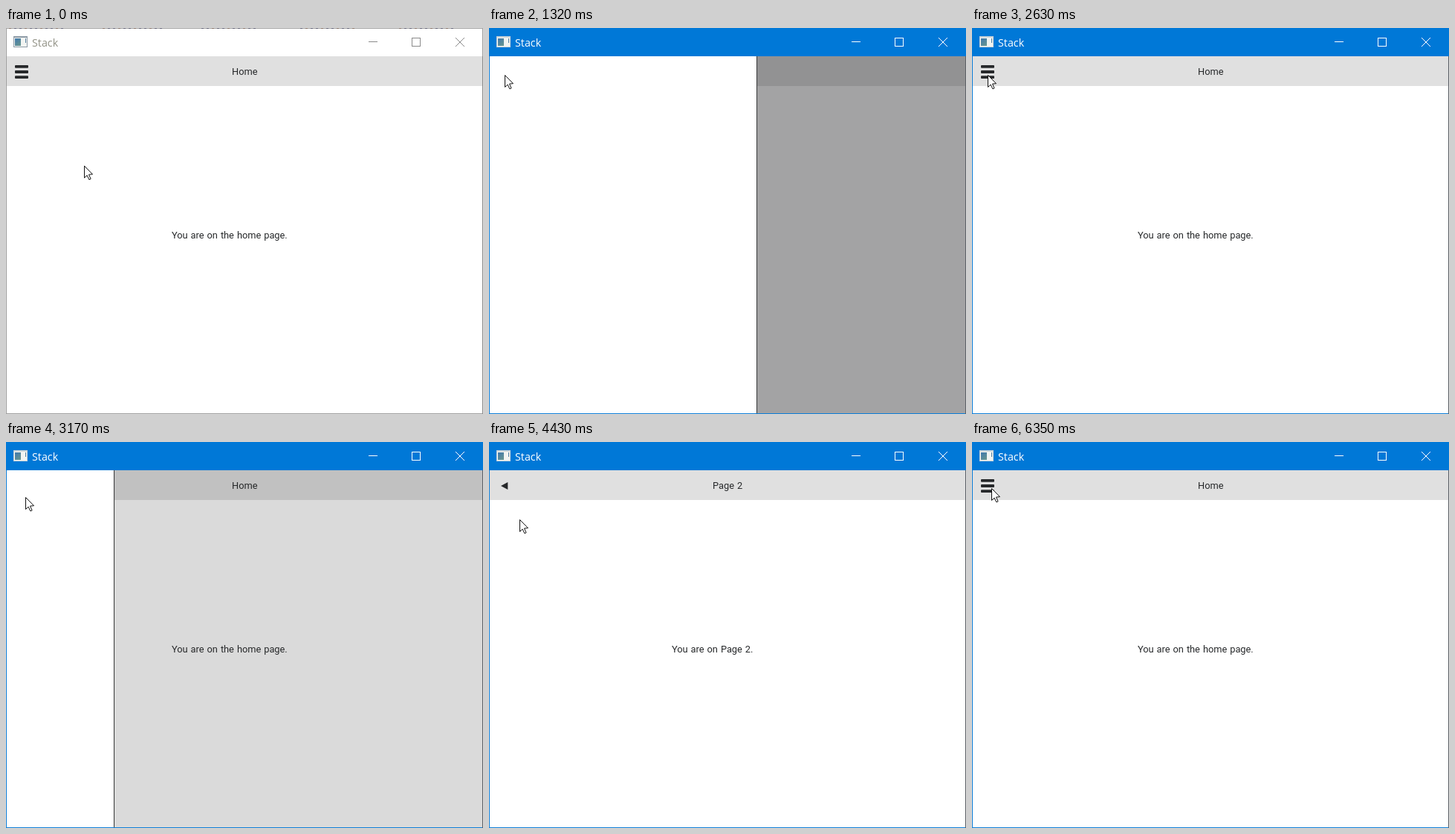
Animation, 642 px wide and 519 px high, one loop 6430 ms. Source, as an HTML page with a canvas:

```html
<!DOCTYPE html>
<html lang="en">
<head>
<meta charset="utf-8">
<title>Stack</title>
<style>
html, body { margin: 0; width: 100%; height: 100%; overflow: hidden; background: #fff; }
canvas { display: block; width: 642px; height: 519px; }
</style>
</head>
<body>
<canvas id="stage" width="642" height="519"></canvas>
<script>
const ctx = document.getElementById('stage').getContext('2d');
const W = 642, H = 519, LOOP = 6430;
const BAR = 38, TOOL = 40, VIEW = 640, DRAWER = 422.4;
const INK = '#26282a';
const UI_FONT = '12.8px Roboto, "Noto Sans", sans-serif';
const TITLE_FONT = '14.3px "Open Sans", "Noto Sans", sans-serif';

const PAGES = {
  home: { title: 'Home', titleX: 304, text: 'You are on the home page.', x: 223 },
  one: { title: 'Page 1', titleX: 301, text: 'You are on Page 1.', x: 246 },
  two: { title: 'Page 2', titleX: 301, text: 'You are on Page 2.', x: 246 }
};

// Screen refreshes: start, end, number of steps
const BURSTS = [
  [0, 540, 8], [690, 920, 4], [1170, 1710, 8], [2090, 2700, 9], [2780, 3170, 6],
  [3240, 3420, 3], [3480, 3650, 2], [3726, 4260, 8], [4430, 4500, 2],
  [5430, 6050, 9], [6120, 6350, 4]
];

const ACTIVE_AT = 530;
const NAV = [
  { at: 1270, from: 'home', to: 'one', dir: 1 },
  { at: 2190, from: 'one', to: 'home', dir: -1 },
  { at: 3796, from: 'home', to: 'two', dir: 1 },
  { at: 5883, from: 'two', to: 'home', dir: -1 }
];
const SLIDE_MS = 400, SLIDE_LAG = 17, DRAWER_MS = 200;
const DRAWER_OPEN = [[660, 1270], [3087, 3796]];
const TOOL_PRESS = [[530, 660], [2085, 2190], [2960, 3087], [5775, 5883]];
const ITEM_PRESS = [[1165, 1270, 0], [3700, 3796, 1]];

// Pointer keys: time, x, y
const POINTER = [
  [0, 105, 185], [470, 21, 63], [2600, 21, 63], [2960, 26, 74], [3170, 26, 74],
  [3420, 38, 100], [3480, 39, 101], [3650, 39, 102], [4260, 39, 102], [4500, 41, 104],
  [5400, 41, 104], [5430, 40, 103], [5740, 22, 66], [6050, 22, 66], [6350, 26, 62]
];

const clamp = v => Math.max(0, Math.min(1, v));
const inOutQuad = u => u < 0.5 ? 2 * u * u : 1 - 2 * (1 - u) * (1 - u);
const outCubic = u => 1 - Math.pow(1 - u, 3);
const within = (t, [a, b]) => t >= a && t < b;

function lastTick(t) {
  const [start, end, n] = BURSTS.filter(b => b[0] <= t).pop();
  const step = (end - start) / (n - 1);
  return start + step * Math.min(n - 1, Math.floor((t - start) / step + 0.1));
}

function pointerAt(t) {
  const i = POINTER.findIndex(k => k[0] > t);
  if (i < 0) return POINTER[POINTER.length - 1].slice(1);
  const a = POINTER[i - 1], b = POINTER[i];
  const u = inOutQuad((t - a[0]) / (b[0] - a[0]));
  return [1, 2].map(k => Math.round(a[k] + (b[k] - a[k]) * u));
}

function drawerAt(t) {
  const ease = start => inOutQuad(clamp((t - start) / DRAWER_MS));
  return DRAWER_OPEN.reduce((p, [open, close]) => p + ease(open) - ease(close), 0);
}

function rect(x, y, w, h, color) {
  ctx.fillStyle = color;
  ctx.fillRect(x, y, w, h);
}

function label(text, x, y, color = INK, font = UI_FONT) {
  ctx.font = font;
  ctx.wordSpacing = font === UI_FONT ? '0.8px' : '0px';
  ctx.fillStyle = color;
  ctx.fillText(text, x, y);
}

function shape(points) {
  ctx.beginPath();
  points.forEach(([x, y]) => ctx.lineTo(x, y));
  ctx.closePath();
}

function drawIcon(active) {
  rect(10, 11, 19, 15, active ? '#c9d3d8' : '#8d9aa5');
  rect(11, 13, 17, 12, '#f2f4f2');
  const fill = ctx.createLinearGradient(12, 14, 20, 25);
  fill.addColorStop(0, '#3f78ad');
  fill.addColorStop(1, '#6f9a8c');
  rect(12, 14, 8, 10, fill);
  rect(26, 14, 1, 6, '#55809f');
}

function drawTitleBar(active) {
  const ink = active ? '#fff' : '#8a8a8a';
  rect(0, 0, W, BAR, active ? '#0078d7' : '#fff');
  drawIcon(active);
  label('Stack', 35, 25, active ? '#fff' : '#929286', TITLE_FONT);
  rect(488, 18, 12, 1, ink);
  ctx.strokeStyle = ink;
  ctx.lineWidth = 1;
  ctx.strokeRect(546.5, 13.5, 11, 11);
  ctx.beginPath();
  ctx.moveTo(605, 13);
  ctx.lineTo(617, 25);
  ctx.moveTo(617, 13);
  ctx.lineTo(605, 25);
  ctx.stroke();
}

function drawBorder(active) {
  const edge = active ? '#0f7fd8' : '#a0a0a0';
  rect(0, BAR, 1, H - BAR, edge);
  rect(0, H - 1, W, 1, edge);
  rect(W - 1, BAR, 1, H - BAR, active ? '#5c6066' : '#8c8c8c');
  if (active) return;
  rect(0, 0, 1, BAR, edge);
  rect(W - 1, 0, 1, BAR, edge);
  rect(0, 0, W, 1, '#a6a6a6');
  // Sliver of whatever lies behind the window
  for (let x = 4, i = 0; x < 630; x += 7, i++) {
    if (Math.sin(i * 12.9) > -0.3) rect(x, 0, 3, 1, i % 3 ? '#66667a' : '#8a7468');
  }
}

function drawToolBar(page, pressed) {
  rect(1, BAR, VIEW, TOOL, '#e0e0e0');
  if (pressed) rect(1, BAR, TOOL, TOOL, 'rgba(51,51,51,0.2)');
  ctx.fillStyle = INK;
  if (page === PAGES.home) {
    for (let i = 0; i < 3; i++) {
      ctx.beginPath();
      ctx.roundRect(12, 50 + i * 7.1, 18, 3.8, 1);
      ctx.fill();
    }
  } else {
    shape([[16, 59], [25.3, 54], [25.3, 64]]);
    ctx.fill();
  }
  label(page.title, page.titleX, 63);
}

function drawPages(t) {
  const nav = NAV.filter(n => n.at <= t).pop();
  if (!nav) {
    label(PAGES.home.text, PAGES.home.x, 283);
    return;
  }
  const u = outCubic(clamp((t - nav.at - SLIDE_LAG) / SLIDE_MS));
  const show = (page, shift) => label(page.text, page.x + Math.round(shift), 283);
  if (u < 1) show(PAGES[nav.from], -nav.dir * u * VIEW);
  show(PAGES[nav.to], nav.dir * (1 - u) * VIEW);
}

function drawDrawer(t) {
  const p = drawerAt(t);
  if (p <= 0.001) return;
  const right = Math.round(1 + DRAWER * p);
  rect(1, BAR, VIEW, H - BAR - 1, `rgba(40,40,42,${0.5 * p})`);
  rect(1, BAR, right - 1, H - BAR - 1, '#fff');
  ITEM_PRESS.filter(k => within(t, k)).forEach(k =>
    rect(1, BAR + k[2] * TOOL, right - 2, TOOL, '#bdbebf'));
  rect(right - 1, BAR, 1, H - BAR - 1, '#353637');
  const x = Math.round(right - DRAWER + 12);
  label('Page 1', x, 63);
  label('Page 2', x, 103);
}

function drawPointer([x, y]) {
  ctx.save();
  ctx.translate(x + 0.5, y + 0.5);
  shape([[0, 0], [0, 16], [3.6, 12.6], [6.4, 18.4], [8.6, 17.4], [6, 11.6], [11, 11.2]]);
  ctx.fillStyle = '#fff';
  ctx.fill();
  ctx.strokeStyle = '#111';
  ctx.lineWidth = 1;
  ctx.stroke();
  ctx.restore();
}

function draw(t) {
  const active = t >= ACTIVE_AT;
  const nav = NAV.filter(n => n.at <= t).pop();
  rect(0, 0, W, H, '#fff');
  drawTitleBar(active);
  ctx.save();
  ctx.beginPath();
  ctx.rect(1, BAR, VIEW, H - BAR - 1);
  ctx.clip();
  drawToolBar(PAGES[nav ? nav.to : 'home'], TOOL_PRESS.some(k => within(t, k)));
  drawPages(t);
  drawDrawer(t);
  ctx.restore();
  drawBorder(active);
  drawPointer(pointerAt(t));
}

const begin = performance.now();
function frame() {
  draw(lastTick((performance.now() - begin) % LOOP));
  requestAnimationFrame(frame);
}
frame();
</script>
</body>
</html>
```
